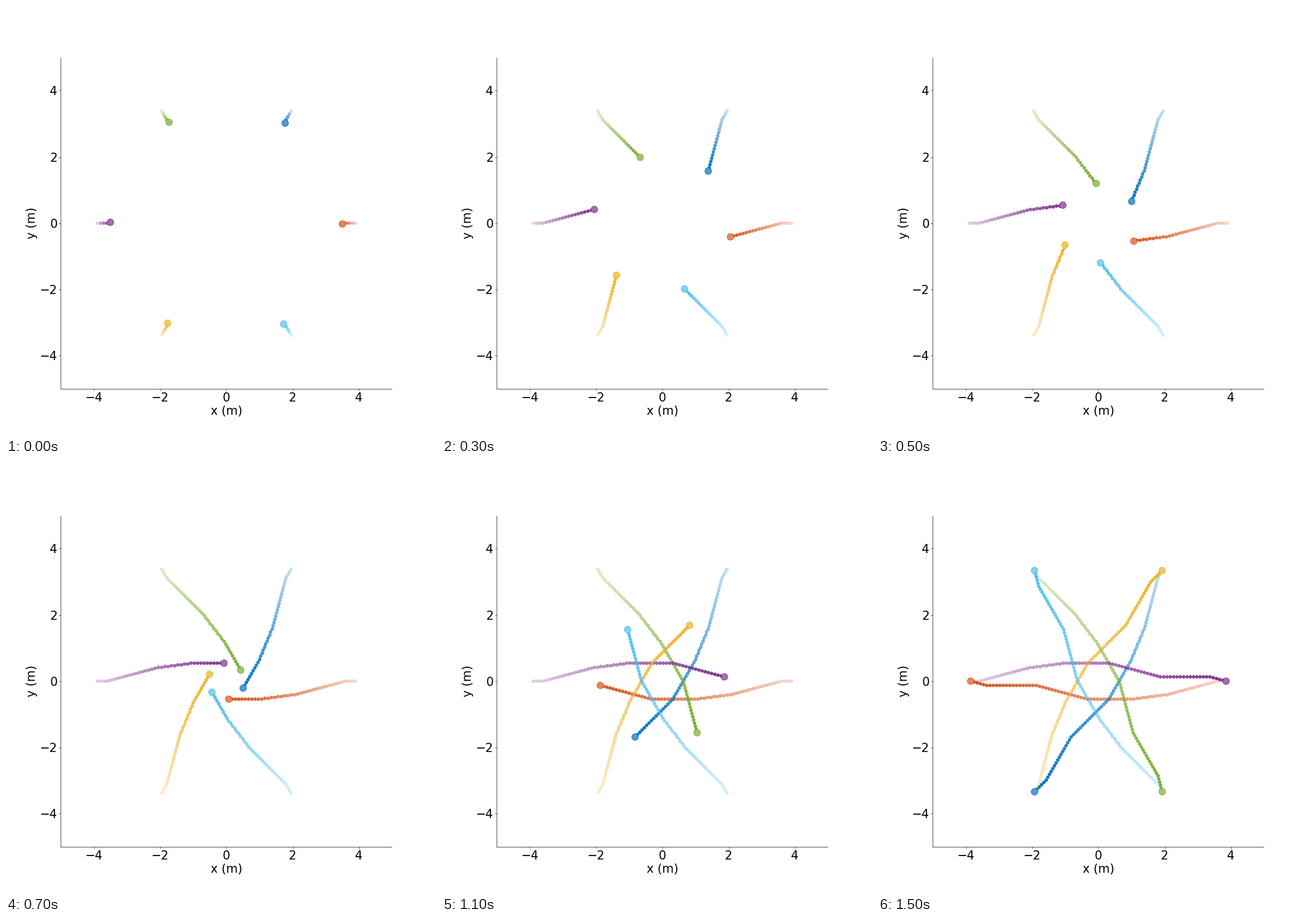
Write a matplotlib script that moves like this. It is 748x748 px and loops after 2600 ms.

```python
import numpy as np
import matplotlib.pyplot as plt
from matplotlib.animation import FuncAnimation

SIDE, INCHES = 748, 12
STEP = 0.1
RADIUS = 0.1
STEPS_PER_FRAME = 5
MOVING_FRAMES, TOTAL_FRAMES = 16, 26

# One agent every 60 degrees, counter-clockwise from the right.
COLORS = [(0.850, 0.325, 0.098), (0.000, 0.447, 0.741), (0.466, 0.674, 0.188),
          (0.494, 0.184, 0.556), (0.929, 0.694, 0.125), (0.301, 0.745, 0.933)]

# Heading of each step, in 15 degree turns away from the inward direction.
TURNS = [0] * 3 + [1] * 16 + [0, 1] * 5 + [0] * 14 + [-1] * 16 + [0] * 15 + [-1] * 5


def base_path():
    moves = -STEP * np.exp(1j * np.radians(15) * np.array(TURNS))
    return 3.9 + np.concatenate([[0], np.cumsum(moves)])


def tint(color, alpha):
    return tuple(alpha * c + 1 - alpha for c in color)


plt.rcParams["font.family"] = "DejaVu Sans"
plt.rcParams["font.size"] = 24
fig = plt.figure(figsize=(INCHES, INCHES), dpi=SIDE / INCHES, facecolor="white")
ax = fig.add_subplot()
ax.set(xlim=(-5, 5), ylim=(-5, 5), aspect="equal", xlabel="x (m)", ylabel="y (m)",
       xticks=range(-4, 5, 2), yticks=range(-4, 5, 2))
ax.spines[["top", "right"]].set_visible(False)

agents = []
for k, color in enumerate(COLORS):
    track = base_path() * np.exp(1j * np.radians(60 * k))
    points = np.column_stack([track.real, track.imag])
    trail = ax.scatter([], [], zorder=1)
    body = ax.add_patch(plt.Circle(points[0], RADIUS, fc=tint(color, 0.7),
                                   ec=color, zorder=2))
    agents.append((color, points, trail, body))


def update(frame):
    count = 5 + STEPS_PER_FRAME * min(frame, MOVING_FRAMES - 1)
    fade = np.linspace(0.2, 1, count)
    for color, points, trail, body in agents:
        trail.set_offsets(points[:count])
        trail.set_color([(*color, a) for a in fade])
        body.center = points[count - 1]
    return [artist for agent in agents for artist in agent[2:]]


anim = FuncAnimation(fig, update, frames=TOTAL_FRAMES, interval=100,
                     repeat=True, repeat_delay=0, blit=False)
plt.show()
```
